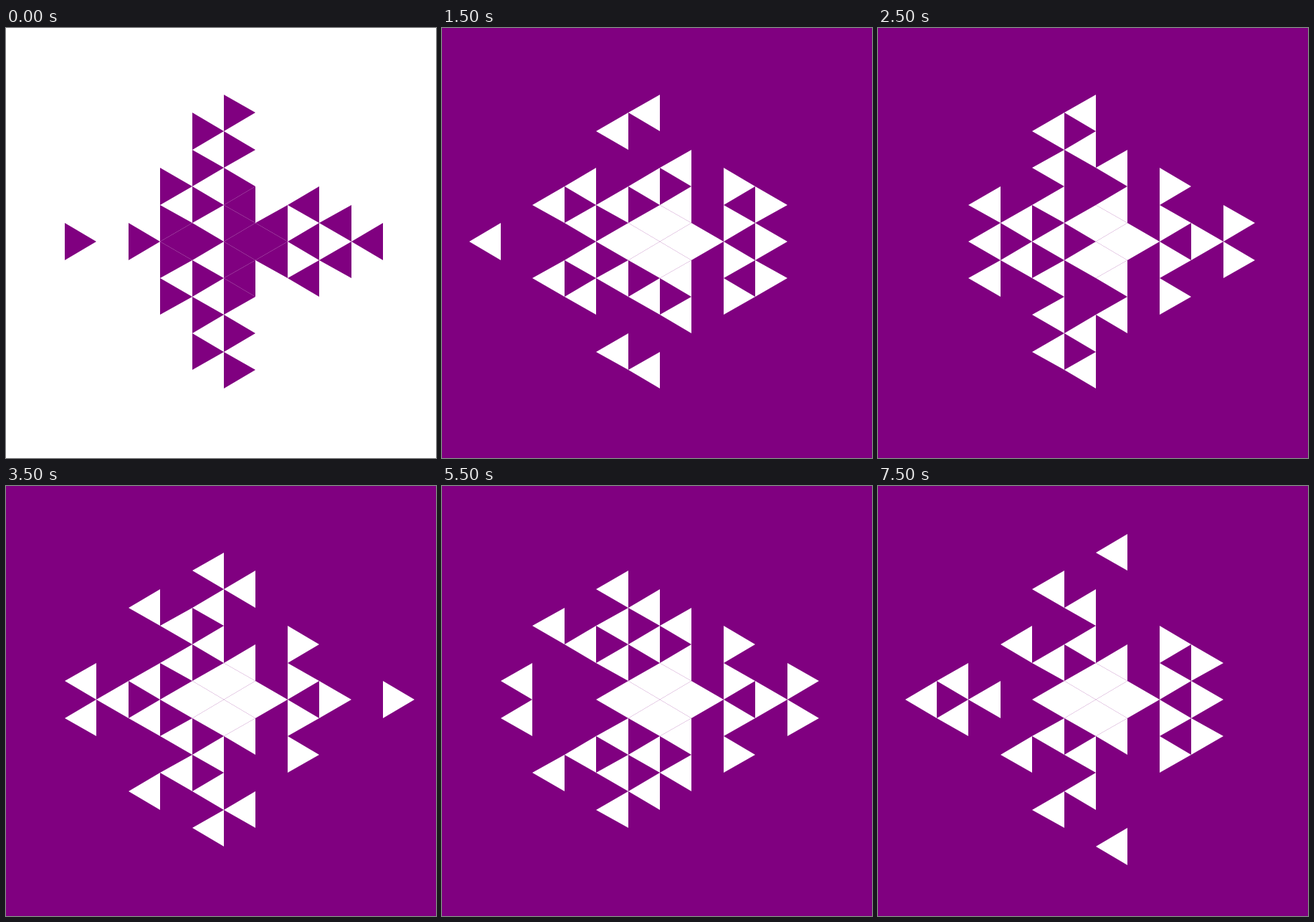
Write an HTML page with a canvas that moves like this. It is 600 px wide and 600 px high and loops after 8 s.

```html
<!DOCTYPE html>
<html>
<head>
<meta charset="utf-8">
<style>
html, body { margin: 0; width: 100%; height: 100%; overflow: hidden; background: #fff; }
canvas { display: block; }
</style>
</head>
<body>
<canvas id="stage" width="600" height="600"></canvas>
<script>
const ctx = document.getElementById('stage').getContext('2d');
const COLORS = ['#ffffff', '#800080'];
const STEP_MS = 500, STEPS = 16;
const HALF = 25.64, HEIGHT = HALF * Math.sqrt(3);
const CX = 304, CY = 297.9;
const COLS = 12, ROWS = 16;   // the grid spans -COLS..COLS and -ROWS..ROWS

// Column -> rows of the starting cells; every row is mirrored about 0.
const SEED = {
  '-5': [0], '-3': [0], '-2': [0, 1, 3], '-1': [0, 2, 4, 6],
  '0': [0, 1, 2, 3, 5, 7], '1': [0, 1], '2': [0, 2], '3': [1], '4': [0]
};

const key = (c, r) => c + ',' + r;
const pointsRight = (c, r) => (c + r) % 2 !== 0;

function eachCell(fn) {
  for (let c = -COLS; c <= COLS; c++)
    for (let r = -ROWS; r <= ROWS; r++) fn(c, r);
}

function seedGrid() {
  const grid = new Map();
  eachCell((c, r) => {
    const rows = SEED[c] || [];
    grid.set(key(c, r), rows.includes(Math.abs(r)) ? 1 : 0);
  });
  return grid;
}

// Live cells survive with 0 or 1 live edge neighbours, dead cells wake on 0 or 2.
// The empty field therefore flips every step.
function evolve(grid, ground) {
  const at = (c, r) => grid.get(key(c, r)) ?? ground;
  const next = new Map();
  eachCell((c, r) => {
    const side = pointsRight(c, r) ? c - 1 : c + 1;
    const n = at(side, r) + at(c, r - 1) + at(c, r + 1);
    const live = at(c, r) ? n < 2 : n % 2 === 0;
    next.set(key(c, r), live ? 1 : 0);
  });
  return next;
}

const history = [seedGrid()];
for (let i = 1; i < STEPS; i++) history.push(evolve(history[i - 1], (i - 1) % 2));

const px = c => Math.round(CX + c * HEIGHT);
const py = r => Math.round(CY + r * HALF);

function triangle(c, r) {
  const right = pointsRight(c, r);
  const base = px(right ? c : c + 1), tip = px(right ? c + 1 : c);
  ctx.beginPath();
  ctx.moveTo(base, py(r - 1));
  ctx.lineTo(base, py(r + 1));
  ctx.lineTo(tip, py(r));
  ctx.closePath();
  ctx.fill();
}

function draw(step) {
  const ground = step % 2;
  ctx.fillStyle = COLORS[ground];
  ctx.fillRect(0, 0, 600, 600);
  ctx.fillStyle = COLORS[1 - ground];
  eachCell((c, r) => {
    if (history[step].get(key(c, r)) !== ground) triangle(c, r);
  });
}

const start = performance.now();
let shown = -1;
function tick() {
  const step = Math.floor((performance.now() - start) / STEP_MS) % STEPS;
  if (step !== shown) draw(shown = step);
  requestAnimationFrame(tick);
}
tick();
</script>
</body>
</html>
```
